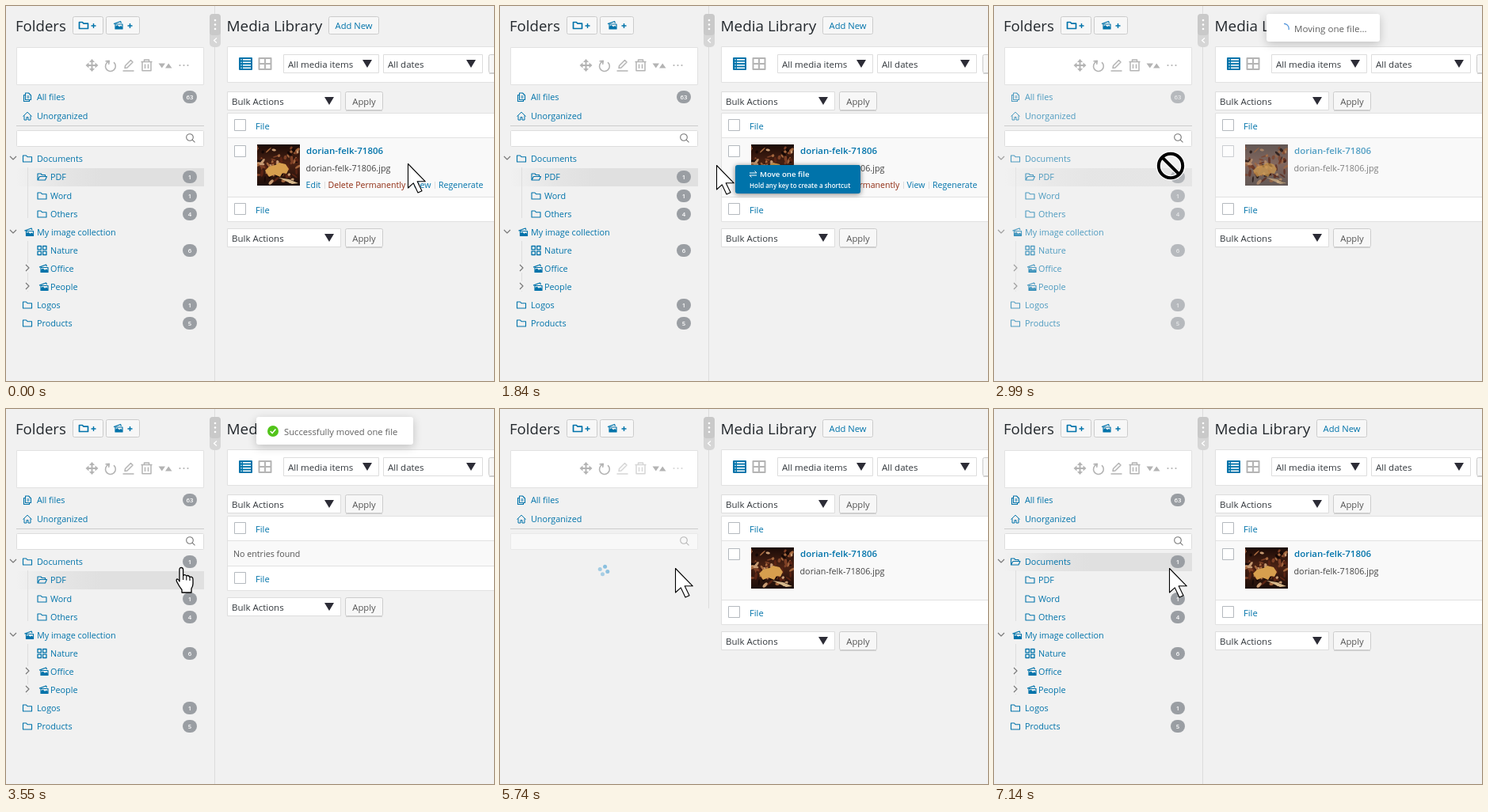
An HTML page with a canvas that plays this animation: 616 px wide and 474 px high, repeating every 8070 ms.

```html
<!DOCTYPE html>
<html lang="en">
<head>
<meta charset="utf-8">
<title>Media library</title>
<style>
html, body { margin: 0; width: 100%; height: 100%; overflow: hidden; background: #f1f1f1; }
canvas { display: block; width: 616px; height: 474px; }
</style>
</head>
<body>
<canvas id="stage" width="616" height="474"></canvas>
<script>
const ctx = document.getElementById('stage').getContext('2d');
const LOOP = 8070;
const BLUE = '#0073aa', GREY = '#b4b4b4', DARK = '#32373c', LINE = '#e1e1e1', BG = '#f1f1f1';
const FILE_NAME = 'dorian-felk-71806';
const FADED = 0.68;

const clamp = v => Math.max(0, Math.min(1, v));
const mix = (a, b, k) => a + (b - a) * k;
const within = (t, a, b) => t >= a && t < b;
// Progress in `n` even jumps, the first at `from`, the last at `to`.
const stepped = (t, from, to, n) =>
  t < from ? 0 : clamp((Math.floor((t - from) / (to - from) * (n - 1) + 0.001) + 1) / n);

function text(s, x, y, size, color = BLUE, weight = 400, align = 'left') {
  ctx.font = `${weight} ${size}px "Open Sans", "Noto Sans", sans-serif`;
  ctx.textAlign = align;
  ctx.fillStyle = color;
  ctx.fillText(s, x, y);
}

function box(x, y, w, h, fill, stroke, r = 0) {
  const inset = stroke ? 0.5 : 0;
  ctx.beginPath();
  ctx.roundRect(x + inset, y + inset, w - 2 * inset, h - 2 * inset, r);
  ctx.fillStyle = fill;
  ctx.fill();
  if (stroke) {
    ctx.strokeStyle = stroke;
    ctx.lineWidth = 1;
    ctx.stroke();
  }
}

function rect(x, y, w, h, fill) {
  ctx.fillStyle = fill;
  ctx.fillRect(x, y, w, h);
}

function disc(x, y, r, fill) {
  ctx.beginPath();
  ctx.arc(x, y, r, 0, Math.PI * 2);
  ctx.fillStyle = fill;
  ctx.fill();
}

function path(d, x, y, { stroke, fill, width = 1.1 }) {
  const p = new Path2D(d);
  ctx.save();
  ctx.translate(x, y);
  ctx.lineWidth = width;
  ctx.lineJoin = 'round';
  if (fill) { ctx.fillStyle = fill; ctx.fill(p); }
  if (stroke) { ctx.strokeStyle = stroke; ctx.stroke(p); }
  ctx.restore();
}

function withAlpha(alpha, draw) {
  ctx.save();
  ctx.globalAlpha *= alpha;
  draw();
  ctx.restore();
}

function withShadow(blur, dy, color, draw) {
  ctx.save();
  ctx.shadowBlur = blur;
  ctx.shadowOffsetY = dy;
  ctx.shadowColor = color;
  draw();
  ctx.restore();
}

// Icons are drawn around their centre.
const ICONS = {
  folder: 'M-5.5 4V-4H-1.5L0 -2.3H5.5V4Z',
  open: 'M-5.5 4V-4H-1.5L0 -2.5H4V-.5M-5.5 4L-3 -.5H6L4 4Z',
  grid: 'M-5.5 -5.5h4.4v4.4h-4.4zM1.1 -5.5h4.4v4.4h-4.4zM-5.5 1.1h4.4v4.4h-4.4zM1.1 1.1h4.4v4.4h-4.4z',
  files: 'M-2.5 -5H1.5L4.5 -2V3.5H-2.5ZM-2.5 -2.5H-4.5V5.5H2.5V3.5M-.5 -1H2.5M-.5 1H2.5',
  home: 'M-5.5 .5L0 -4.8L5.5 .5M-4 -.5V5H-1V1.5H1V5H4V-.5',
  move: 'M-6 0H6M0 -6V6',
  moveTips: 'M-8 0l4 -3.5v7zM8 0l-4 -3.5v7zM0 -8l-3.5 4h7zM0 8l-3.5 -4h7z',
  reload: 'M-2.5 -5.8A6.4 6.4 0 1 0 4 -4.8M-6.5 -6.3L-1.7 -6.6L-2.4 -2.2',
  pencil: 'M-4.5 3.5L-4 .5L3 -6.5L5.5 -4L-1.5 3ZM-7 7H7',
  trash: 'M-7 -4.5H7M-3 -4.5V-7H3V-4.5M-5.5 -4.5V6.8H5.5V-4.5M-2 -1.5V4M2 -1.5V4',
  sort: 'M-8.5 -3H0L-4.2 3ZM0 3H8.5L4.2 -3Z',
  search: 'M3.3 -1A4.3 4.3 0 1 1 -5.3 -1A4.3 4.3 0 1 1 3.3 -1M2.2 2.2L5.5 5.3'
};

function collection(x, y) {
  path('M-5.5 -1.8L3 -5L4 -3', x, y, { stroke: BLUE, width: 1.3 });
  path('M-3.5 -1.5H5.5V4.5H-3.5Z', x, y, { stroke: BLUE, fill: BG, width: 1.2 });
  path('M-3.5 4.5V1.5L-1 -.5L1.5 1.8L3.5 .6L5.5 2.2V4.5Z', x, y, { fill: BLUE });
}

function icon(name, x, y, color = BLUE, width = 1.1) {
  if (name === 'collection') collection(x, y);
  else path(ICONS[name], x, y, { stroke: color, width });
}

function button(x, y, w, label) {
  rect(x + 1, y + 24, w - 2, 1, '#d0d0d0');
  box(x, y, w, 24, '#f7f7f7', '#ccc', 2);
  if (label) text(label, x + w / 2, y + 16.5, 11.3, '#555', 400, 'center');
}

function select(x, y, w, label) {
  box(x, y, w, 24, '#fff', '#ddd');
  text(label, x + 6, y + 17, 11.5, DARK);
  path('M-6 -5H6L0 5Z', x + w - 15, y + 12, { fill: '#2c2c36' });
}

function checkbox(x, y) {
  box(x, y, 15, 15, '#fff', '#b4b9be');
}

function badge(n, y) {
  box(223, y - 8, 18, 16, '#9a9ea3', null, 8);
  text(n, 232, y + 3, 7.8, '#fff', 600, 'center');
}

function photo(x, y) {
  ctx.save();
  ctx.beginPath();
  ctx.rect(x, y, 54, 52);
  ctx.clip();
  ctx.translate(x, y);
  const base = ctx.createLinearGradient(0, 0, 0, 52);
  base.addColorStop(0, '#1a0a06');
  base.addColorStop(0.45, '#4a2214');
  base.addColorStop(1, '#1c0d09');
  rect(0, 0, 54, 52, base);
  const tones = ['#7d4026', '#150806', '#a5683f', '#5a2414', '#c79a72'];
  let seed = 11;
  const rnd = () => (seed = seed * 16807 % 2147483647) / 2147483647;
  for (let i = 0; i < 70; i++) {
    ctx.beginPath();
    ctx.ellipse(rnd() * 54, 4 + rnd() * 44, 1.5 + rnd() * 3.5, 0.8 + rnd() * 1.2, rnd() * 3, 0, 7);
    ctx.fillStyle = tones[i % 5];
    ctx.fill();
  }
  path('M10 33L15 28L23 26L28 23L36 25L40 31L37 37L32 36L29 41L22 38L15 41Z', 0, 0, { fill: '#d79f4e' });
  path('M27 42L40 44L52 49L44 50Z', 0, 0, { fill: '#d8b98c' });
  ctx.restore();
}

function loader(x, y, t) {
  const turn = t / 1200 * Math.PI * 2;
  for (let i = 0; i < 4; i++) {
    const a = turn + i * Math.PI / 2;
    const glow = 0.5 + 0.15 * Math.cos(t / 1000 * Math.PI + i * 1.2);
    withAlpha(glow, () => disc(x + 5 * Math.cos(a), y + 5 * Math.sin(a), 2.5, '#4fa3d4'));
  }
}

function highlight(y) {
  const g = ctx.createLinearGradient(13, 0, 120, 0);
  g.addColorStop(0, 'rgba(222,222,222,0)');
  g.addColorStop(0.55, 'rgba(222,222,222,.65)');
  g.addColorStop(1, '#e0e0e0');
  rect(13, y - 11, 237, 23, g);
}

function chevron(x, y, down) {
  path(down ? 'M-4 -2L0 2L4 -2' : 'M-2 -4L2 0L-2 4', x, y, { stroke: '#777' });
}

function treeRow(y, level, label, name, count) {
  const x = 21 + level * 18.5;
  icon(name, x + (name === 'collection' ? 8 : 6), y, BLUE, name === 'grid' ? 1.3 : 1.1);
  text(label, level ? 56 : 39, y + 4, 10.8);
  if (count) badge(count, y);
}

function tree(s, t) {
  highlight(s.selected === 'PDF' ? 216 : 193);
  if (s.dropHover) withAlpha(0.6, () => highlight(193));
  rect(27, 204, 1, 64, '#dedede');
  rect(27, 297, 1, 64, '#dedede');
  chevron(9, 192, true);
  chevron(9, 285, true);
  for (const y of [331, 354]) {
    rect(24, y - 6, 8, 12, BG);
    chevron(27, y, false);
  }
  const opened = s.selected === 'Documents';
  const n = v => s.counts ? v : 0;
  withAlpha(s.opening ? 0.5 : 1, () =>
    treeRow(193, 0, 'Documents', opened ? 'open' : 'folder', n(s.moved && 1)));
  treeRow(216, 1, 'PDF', opened ? 'folder' : 'open', n(!s.moved && 1));
  treeRow(240, 1, 'Word', 'folder', n(1));
  treeRow(263, 1, 'Others', 'folder', n(4));
  treeRow(286, 0, 'My image collection', 'collection');
  treeRow(309, 1, 'Nature', 'grid', n(6));
  treeRow(332, 1, 'Office', 'collection');
  treeRow(355, 1, 'People', 'collection');
  treeRow(378, 0, 'Logos', 'folder', n(1));
  treeRow(401, 0, 'Products', 'folder', n(5));
  if (s.opening) loader(131, 193, t - 4870);
}

function sidebar(s, t) {
  text('Folders', 12, 32, 18.6, '#23282d');
  box(84, 13, 39, 23, '#f7f7f7', '#ccc', 2);
  icon('folder', 98, 24.5, BLUE, 1.7);
  box(126, 13, 43, 23, '#f7f7f7', '#ccc', 2);
  collection(141.5, 24.5);
  for (const x of [110.5, 156.5]) path('M-3 0H3M0 -3V3', x, 25, { stroke: BLUE, width: 1.4 });

  box(13, 52, 237, 48, '#fff', '#e2e2e2');
  icon('move', 108.5, 75, GREY, 2);
  path(ICONS.moveTips, 108.5, 75, { fill: GREY });
  icon('reload', 132, 76, GREY, 1.6);
  withAlpha(s.toolAlpha, () => {
    icon('pencil', 154.5, 75, GREY, 1.5);
    icon('trash', 177.5, 75, GREY, 1.5);
    for (const x of [219.5, 224.5, 229.5]) disc(x, 75, 1.1, GREY);
  });
  path(ICONS.sort, 201, 75.5, { fill: GREY });

  withAlpha(s.moving ? FADED : 1, () => {
    icon('files', 27, 115);
    text('All files', 39, 119, 10.8);
    if (s.counts) badge(63, 115);
    icon('home', 27, 139, BLUE, 1);
    text('Unorganized', 39, 143, 10.8);
  });
  rect(13, 151, 237, 1, '#ccc');
  withAlpha(s.treeAlpha ? 1 : 0.5, () => {
    box(13, 157, 237, 21, '#fff', '#ddd', 1);
    icon('search', 233, 167, '#777');
  });

  if (s.treeAlpha) withAlpha(s.treeAlpha, () => tree(s, t));
  else loader(131, 204, t - 6280);

  rect(263, 0, 1, s.treeAlpha ? 474 : 252, '#dcdcdc');
  box(257, 10, 14, 42, '#d6d6d6', null, 5);
  box(257, 10, 14, 27, '#c9c9c9', null, 4);
  for (const y of [18, 23.5, 29]) disc(264, y, 1.3, '#fff');
  path('M2 -3L-1.5 0L2 3', 264, 43.5, { stroke: '#fff', width: 1.3 });
}

function viewIcons() {
  box(294, 65, 17, 16, BLUE, null, 1);
  for (let y = 67; y < 81; y += 3.5) {
    disc(297, y + 0.8, 0.8, '#fff');
    rect(299, y, 10, 1.6, '#fff');
  }
  path('M-7.5 -7H7.5V7H-7.5ZM0 -7V7M-7.5 0H7.5', 327, 73, { stroke: GREY, width: 2 });
}

function tableBar(y) {
  rect(280, y, 336, 30, '#fff');
  checkbox(288, y + 7);
  text('File', 315, y + 19.5, 11.2);
}

function fileRow(s) {
  withAlpha(s.moving ? FADED : 1, () => {
    checkbox(288, 176);
    photo(317, 175);
    text(FILE_NAME, 379, 187, 11.5, BLUE, 600);
    text(FILE_NAME + '.jpg', 378.5, 209, 10.8, '#444');
  });
  if (!s.actions) return;
  text('Edit', 378.5, 230, 10.6);
  text('Delete Permanently', 406.5, 230, 10.6, '#8f2c12');
  text('View', 513.5, 230, 10.6);
  text('Regenerate', 546, 230, 10.6);
  for (const x of [402, 509, 541]) rect(x, 222, 1, 9, '#ddd');
}

function library(s) {
  text('Media Library', 278.5, 32, 18.9, '#23282d');
  box(407, 13, 64, 23, '#f7f7f7', '#ccc', 2);
  text('Add New', 439, 29, 11.2, BLUE, 500, 'center');

  box(279, 51, 345, 46, '#fff', LINE);
  viewIcons();
  select(350, 61, 121, 'All media items');
  select(476, 61, 126, 'All dates');
  button(609, 61, 40);

  select(279, 108, 144, 'Bulk Actions');
  button(428, 108, 48, 'Apply');

  const rowHeight = s.empty ? 32 : 75;
  const foot = 167 + rowHeight;
  box(279, 135, 345, rowHeight + 63, '#f9f9f9', LINE);
  tableBar(136);
  rect(280, 166, 336, 1, LINE);
  if (s.empty) text('No entries found', 287, 187, 10.7, '#555');
  else fileRow(s);
  tableBar(foot);
  rect(280, foot - 1, 336, 1, LINE);
  select(279, foot + 39, 144, 'Bulk Actions');
  button(428, foot + 39, 48, 'Apply');
}

function toast(s, t) {
  const done = s.toast === 'done';
  withAlpha(s.toastAlpha, () => {
    const x = done ? 316 : 344, w = done ? 198 : 143;
    withShadow(12, 3, 'rgba(0,0,0,.2)', () => box(x, 10, w, 35, '#fff', null, 3));
    if (done) {
      disc(337, 28, 7, '#52c41a');
      path('M-3.3 0L-.9 2.6L3.4 -2.4', 337, 28, { stroke: '#fff', width: 1.5 });
      text('Successfully moved one file', 351, 33, 11.25, '#606060');
    } else {
      ctx.beginPath();
      const a = (t - 2990) / 1000 * Math.PI * 2;
      ctx.arc(366, 28.5, 6.2, a - Math.PI / 2, a + 0.25);
      ctx.strokeStyle = '#4a90d9';
      ctx.lineWidth = 1.2;
      ctx.stroke();
      text('Moving one file...', 379, 33, 11.6, '#606060');
    }
  });
}

function dragTip({ x, y }) {
  withShadow(6, 1, 'rgba(0,0,0,.5)', () => box(x, y, 158, 36, BLUE, null, 3));
  path('M0 -1.5H9L6.5 -4M9 1.5H0L2.5 4', x + 18, y + 11.5, { stroke: '#fff', width: 1 });
  text('Move one file', x + 31, y + 15, 9.7, '#fff', 600);
  text('Hold any key to create a shortcut', x + 18, y + 28.5, 8, '#fff', 600);
}

function arrow(x, y) {
  path('M.5 .5V31L7.2 24.8L13 37L18 34.8L12.2 22.8H22.3Z', x, y, { fill: '#fff', stroke: '#000', width: 1.1 });
}

function hand(x, y) {
  path('M-2 2Q-2 -.5 .3 -.5Q2.6 -.5 2.6 2V9.5Q4.5 7.5 6.8 10Q9 8.5 11 11.3Q15 10.5 15 14.5V20Q15 23 13 26V31H1V27.5Q-2 24 -5.5 17Q-6.5 14 -4.5 14Q-3 14.5 -2 17Z',
    x, y, { fill: '#fff', stroke: '#000', width: 1.3 });
  path('M2.6 9.5V15M6.8 10.5V15.5M11 11.5V16', x, y, { stroke: '#000' });
}

function forbidden(x, y) {
  for (const [color, width] of [['#fff', 6.5], ['#000', 4]]) {
    path('M15.2 0A15.2 15.2 0 1 1 -15.2 0A15.2 15.2 0 1 1 15.2 0M-10.5 -10.5L10.5 10.5', x, y, { stroke: color, width });
  }
}

function pointer(t) {
  if (t < 1530) {
    const a = stepped(t, 690, 770, 2), b = stepped(t, 920, 1000, 2);
    return { x: 507 - 6 * a - 2 * b, y: 199 - 8 * a - 4 * b };
  }
  const u = stepped(t, 1530, 2070, 8);
  return { x: Math.round(mix(499, 221, 1 - (1 - u) ** 1.7)), y: Math.round(mix(187, 201, clamp(u * 1.6))) };
}

// The label trails the pointer slightly, then settles.
function tipSpot(t) {
  const u = clamp(stepped(t, 1530, 2070, 8) - 0.085);
  const lag = 1 - (1 - u) ** 1.7;
  return {
    x: t >= 2230 ? 224 : Math.round(mix(501, 223, lag)),
    y: Math.round(mix(187, 201, clamp(u * 1.9)))
  };
}

function stateAt(t) {
  const moving = within(t, 2920, 3470);
  const reveal = stepped(t, 6600, 7140, 8);
  const blank = within(t, 5740, 6360);
  return {
    moving,
    moved: t >= 3470,
    dragging: within(t, 1530, 2920),
    dropHover: within(t, 1990, 2920),
    empty: within(t, 3470, 5740),
    actions: t < 2920,
    selected: t < 4870 ? 'PDF' : 'Documents',
    opening: within(t, 4870, 5740),
    counts: !within(t, 5740, 6600),
    treeAlpha: blank ? 0 : moving ? FADED : t >= 6360 ? mix(0.5, 1, reveal) : 1,
    toolAlpha: t >= 5740 ? mix(0.55, 1, reveal) : 1,
    toast: moving ? 'busy' : within(t, 3470, 5740) ? 'done' : '',
    toastAlpha: within(t, 2920, 2990) || within(t, 3470, 3550) ? 0.5 : 1
  };
}

function draw(t) {
  const s = stateAt(t);
  rect(0, 0, 616, 474, BG);
  library(s);
  sidebar(s, t);
  if (s.toast) toast(s, t);
  if (s.dragging) dragTip(tipSpot(t));
  const { x, y } = pointer(t);
  if (s.moving) forbidden(223, 202);
  else if (within(t, 2230, 4870)) hand(x, y);
  else arrow(x, y);
}

let start;
function frame(now) {
  start ??= now;
  draw((now - start) % LOOP);
  requestAnimationFrame(frame);
}
draw(0);
requestAnimationFrame(frame);
</script>
</body>
</html>
```
